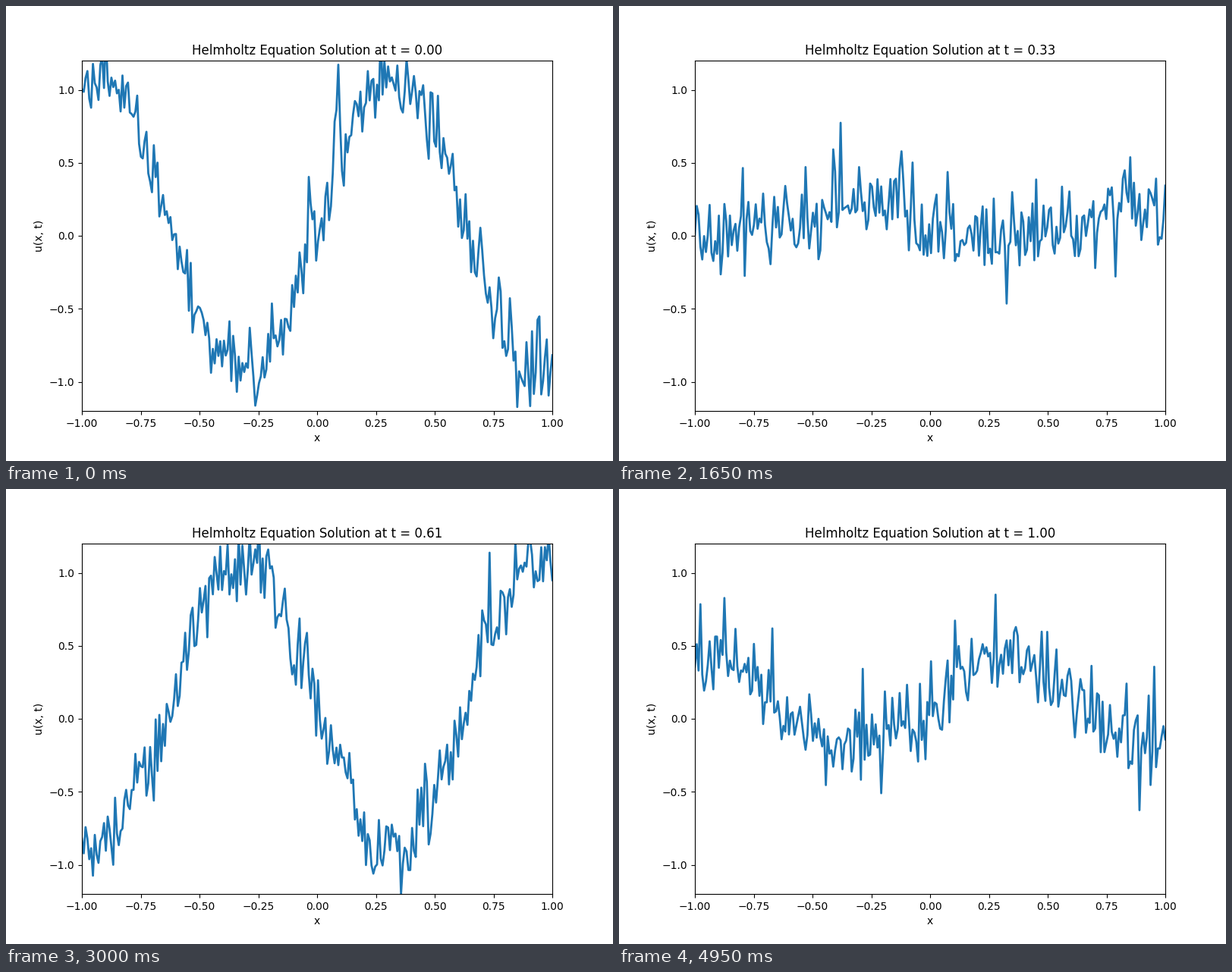
Animation, 800 px wide and 600 px high, one loop 5 s. Source, as a matplotlib script:

```python
import numpy as np
import matplotlib.pyplot as plt
from matplotlib.animation import FuncAnimation

FRAMES, POINTS = 100, 256
WAVE_NUMBER = 5

x = np.linspace(-1, 1, POINTS)
t = np.linspace(0, 1, FRAMES)

# Standing wave with Gaussian noise and one-sided exponential spikes
rng = np.random.default_rng(42)
shape = (FRAMES, POINTS)
noise = rng.normal(0, 0.13, shape) + rng.exponential(0.1, shape)
u = np.cos(WAVE_NUMBER * t)[:, None] * np.sin(WAVE_NUMBER * x) + noise

plt.rcParams["font.family"] = "DejaVu Sans"
fig, ax = plt.subplots(figsize=(8, 6), dpi=100)
line, = ax.plot(x, u[0], lw=2)
ax.set_xlim(-1, 1)
ax.set_ylim(-1.2, 1.2)
ax.set_xlabel("x")
ax.set_ylabel("u(x, t)")
title = ax.set_title("")


def update(i):
    line.set_ydata(u[i])
    title.set_text(f"Helmholtz Equation Solution at t = {t[i]:.2f}")
    return line, title


anim = FuncAnimation(fig, update, frames=FRAMES, interval=50,
                     init_func=lambda: update(0), repeat=True, repeat_delay=0)

plt.show()
```
